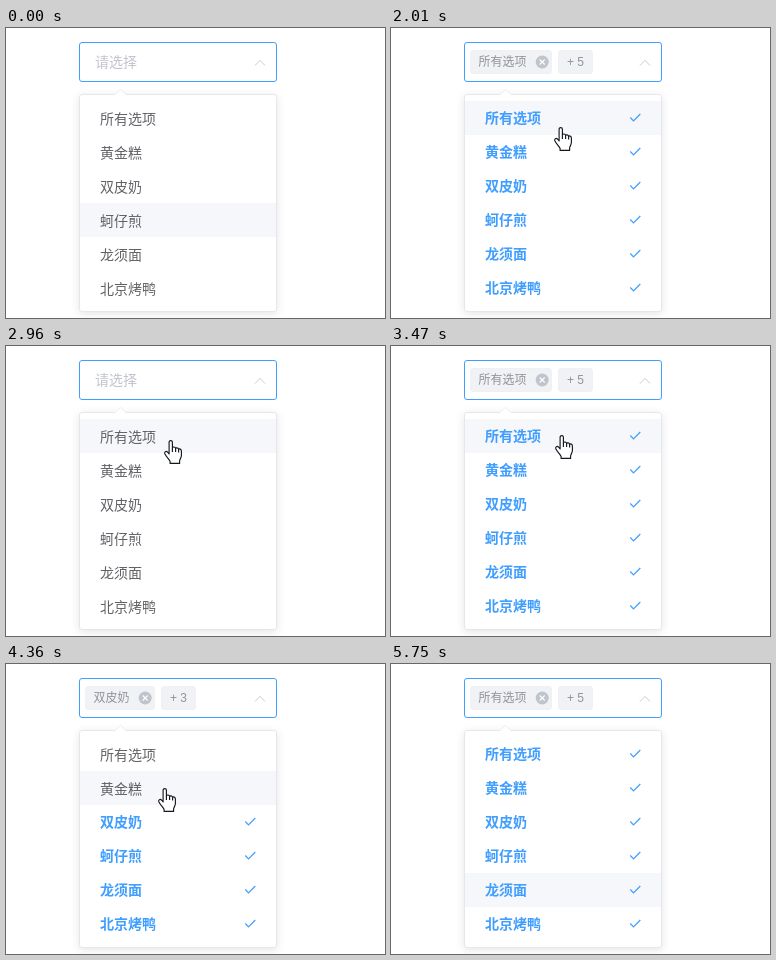
An HTML page that plays this animation: 379x290 px, repeating every 6.41 s.

```html
<!DOCTYPE html>
<html lang="zh-CN">
<head>
<meta charset="utf-8">
<title>Multi-select</title>
<style>
html, body { margin: 0; width: 100%; height: 100%; overflow: hidden; background: #fff; }
svg { display: block; width: 379px; height: 290px; }
text { font-family: "Noto Sans CJK SC", "Noto Sans CJK", "Noto Sans", sans-serif; font-size: 14px; fill: #606266; }
.row path { fill: none; stroke: #409eff; stroke-width: 1.2; visibility: hidden; }
.row.on path { visibility: visible; }
.row.on text { fill: #409eff; font-weight: 700; }
.hint { fill: #c0c4cc; }
.tag text { font-size: 12px; fill: #909399; }
.tag text.more { font-family: "Liberation Sans", Arial, sans-serif; }
.tag rect { fill: #f0f2f5; stroke: #e9eaee; stroke-opacity: .5; }
.panel { filter: drop-shadow(0 2px 4px rgba(0, 0, 0, .1)); }
.cursor { fill: #fff; stroke: #14171f; stroke-width: 1.15; stroke-linejoin: round; }
</style>
</head>
<body>
<svg viewBox="0 0 379 290" xmlns="http://www.w3.org/2000/svg">
  <rect x="73.5" y="14.5" width="197" height="39" rx="2.5" fill="#fff" stroke="#409eff"/>
  <text id="hint" class="hint" x="89" y="39">请选择</text>
  <g id="tags" class="tag">
    <rect id="box" x="79.5" y="22.5" height="23" rx="2.5"/>
    <text id="name" x="87.5" y="38"></text>
    <g id="close">
      <circle r="6.5" fill="#c0c4cc"/>
      <path d="M-2.5-2.5 2.5 2.5M2.5-2.5-2.5 2.5" stroke="#fff" stroke-width="1.1"/>
    </g>
    <g id="rest">
      <rect x=".5" y="22.5" width="34" height="23" rx="2.5"/>
      <text id="count" class="more" x="9" y="38"></text>
    </g>
  </g>
  <path d="M249 37.5 254 32.3 259 37.5" fill="none" stroke="#c0c4cc" stroke-width=".9"/>
  <rect class="panel" x="73.5" y="66.5" width="197" height="217" rx="2.5" fill="#fff" stroke="#e4e7ed"/>
  <path d="M108.5 67 114.5 61.5 120.5 67" fill="#fff" stroke="#ebeef5"/>
  <path d="M109 67.5H120" stroke="#fff" stroke-width="1.4"/>
  <rect id="hover" x="74" width="196" height="34" fill="#f5f7fa"/>
  <g id="rows"></g>
  <g id="hand" class="cursor">
    <path d="M-.9 14V2.2C-.9 .1 2.4 .1 2.4 2.2V8C2.7 6.6 5.4 6.7 5.6 8.5C6 7.5 8.4 7.7 8.6 9.4C9.2 8.5 11.4 9 11.4 11V15.6C11.4 18 9.6 19.4 9.6 21V23.4H.1V21.4C-.9 19.4-3.6 17-5.2 13.8C-6 11.8-3.8 10.6-2.4 12.2Z"/>
    <path d="M2.4 8V12M5.6 8.5V12M8.6 9.4V12.4" fill="none"/>
  </g>
  <path id="arrow" class="cursor" d="M.5.6V16.4L4.2 13 6.6 18.4 9 17.4 6.7 12.2H11.5Z"/>
</svg>
<script>
const LOOP = 6410, LEAVE = 5750, TICK = 60, TOP = 73, ROW = 34;
const names = ["所有选项", "黄金糕", "双皮奶", "蚵仔煎", "龙须面", "北京烤鸭"];
const $ = id => document.getElementById(id);

// [time, index of the first selected row]
const picks = [[0, 6], [1090, 0], [2140, 6], [3340, 0], [4170, 2], [5070, 0]];

// Pointer moves: [start, ticks, x, y, from x, from y]
const moves = [
  [260, 4, 170, 98, 272, 228],
  [830, 1, 170, 99],
  [2010, 1, 169, 99],
  [2530, 4, 151, 128],
  [2900, 2, 164, 94],
  [3020, 2, 169, 89],
  [3470, 1, 170, 89],
  [3600, 4, 159, 123],
  [4360, 1, 158, 124],
  [4880, 1, 159, 125],
  [5330, 7, 289, 275]
];

// Expand the moves into held positions, with the row hovered at each.
const track = [];
let hovered = 3, last;
function hold(t, x, y) {
  const inside = x > 74 && x < 270 && y > TOP && y < TOP + ROW * 6;
  if (inside) hovered = Math.floor((y - TOP) / ROW);
  track.push({ t, x: Math.round(x), y: Math.round(y), inside, hovered });
}
for (const [t, n, x, y, fromX, fromY] of moves) {
  const enters = fromX !== undefined;
  if (enters) {
    last = [fromX, fromY];
    hold(t, fromX, fromY);
  }
  for (let i = 1; i <= n; i++) {
    const k = i / n;
    hold(t + (enters ? i : i - 1) * TICK, last[0] + (x - last[0]) * k, last[1] + (y - last[1]) * k);
  }
  last = [x, y];
}

$("rows").innerHTML = names.map((name, i) => {
  const y = TOP + ROW * i;
  return `<g class="row"><text x="94">${name}</text><path d="M239.3 ${y + 16.5}l3.2 3.5 6.8-7"/></g>`;
}).join("");
const rows = [...$("rows").children];

const show = (el, on) => el.setAttribute("visibility", on ? "visible" : "hidden");
const place = (el, x, y) => el.setAttribute("transform", `translate(${x} ${y})`);

function draw(t) {
  const first = picks.filter(p => p[0] <= t).pop()[1];
  rows.forEach((row, i) => {
    const on = i >= first;
    row.setAttribute("class", on ? "row on" : "row");
    row.firstChild.setAttribute("y", TOP + ROW * i + (on ? 22 : 23));
  });

  const any = first < 6;
  show($("hint"), !any);
  show($("tags"), any);
  if (any) {
    const w = names[first].length * 12;
    $("name").textContent = names[first];
    $("count").textContent = "+ " + (5 - first);
    $("box").setAttribute("width", w + 33);
    place($("close"), w + 103.2, 34);
    place($("rest"), w + 119, 0);
  }

  const p = track.filter(s => s.t <= t).pop();
  const seen = p && t < LEAVE;
  $("hover").setAttribute("y", TOP + ROW * (p ? p.hovered : 3));
  show($("hand"), seen && p.inside);
  show($("arrow"), seen && !p.inside);
  if (seen) {
    place($("hand"), p.x, p.y);
    place($("arrow"), p.x, p.y);
  }
}

let start;
function frame(now) {
  start ??= now;
  draw((now - start) % LOOP);
  requestAnimationFrame(frame);
}
draw(0);
requestAnimationFrame(frame);
</script>
</body>
</html>
```
